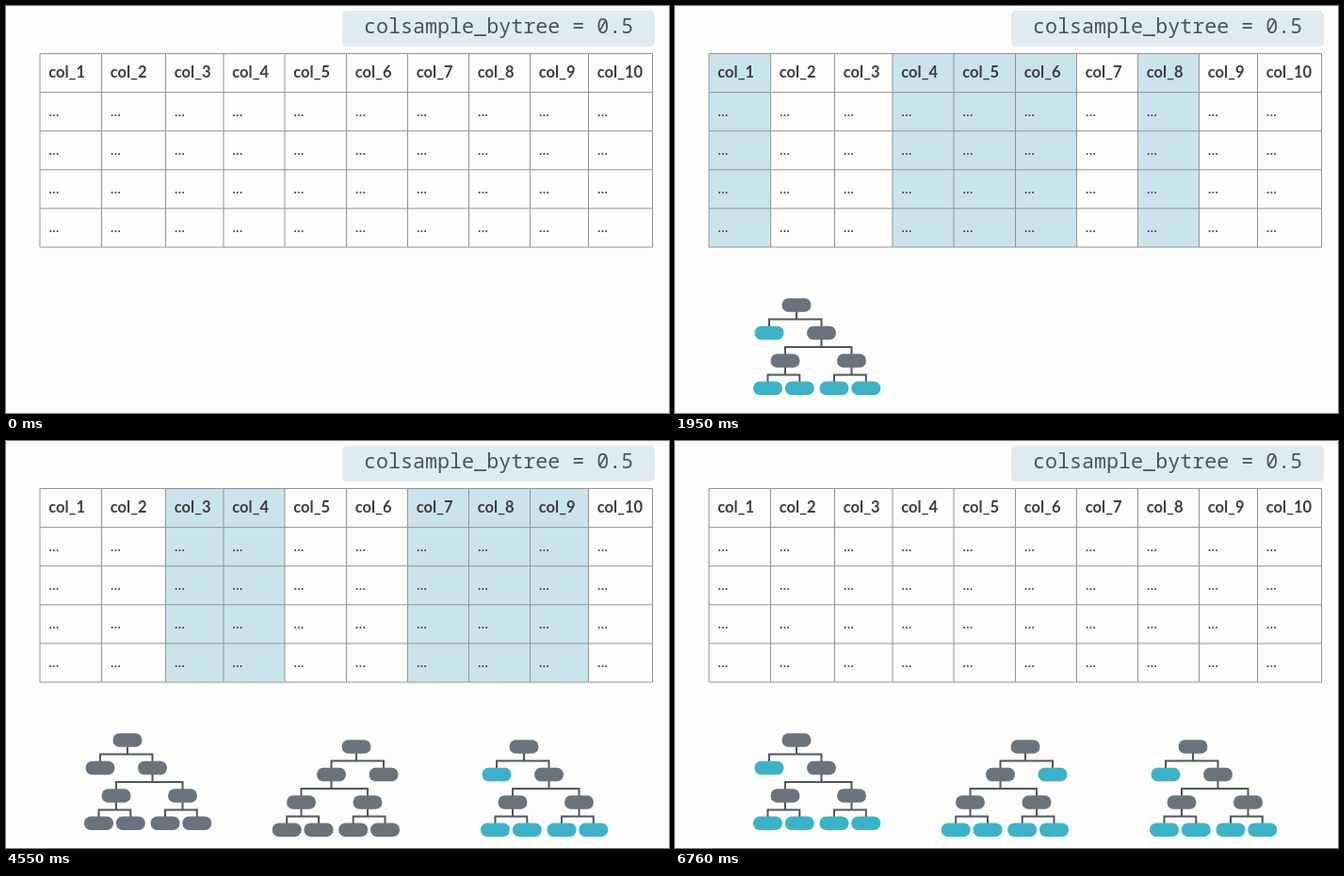
Recreate the animation shown at these times as an HTML page. Size 704x432 px, loop 7150 ms.

```html
<!DOCTYPE html>
<html lang="en">
<head>
<meta charset="utf-8">
<title>Column sampling by tree</title>
<style>
  html, body { margin: 0; width: 100%; height: 100%; overflow: hidden; background: #fdfdfc; }
  svg { display: block; width: 704px; height: 432px; }
  text { fill: #3c3d3f; }
  .code { font: 21.7px "Noto Sans Mono", monospace; fill: #4b5358; white-space: pre; }
  .head { font: bold 16.5px Lato, sans-serif; }
  .cell { font: 16px Lato, sans-serif; }
  .grid { fill: none; stroke: #919394; stroke-width: 1; }
  .sample { fill: #cae4ec; }
  .link { fill: none; stroke: #50565b; stroke-width: 2; }
  .node { fill: #68737d; }
  .leaf { fill: #3cb2c8; }

  .sample, .tree, .leaf { animation: 7150ms step-end infinite; }
  .sample.s0 { animation-name: sample0; }
  .sample.s1 { animation-name: sample1; }
  .sample.s2 { animation-name: sample2; }
  .tree.s0 { animation-name: grow0; }
  .tree.s1 { animation-name: grow1; }
  .tree.s2 { animation-name: grow2; }
  .s0 .leaf { animation-name: rest0; }
  .s1 .leaf { animation-name: rest1; }

  @keyframes sample0 { 0%, 45.4545%, 100% { opacity: 0 } 27.2727% { opacity: 1 } }
  @keyframes sample1 { 0%, 63.6363%, 100% { opacity: 0 } 45.4545% { opacity: 1 } }
  @keyframes sample2 { 0%, 80%, 100% { opacity: 0 } 63.6363% { opacity: 1 } }
  @keyframes grow0 { 0% { opacity: 0 } 27.2727%, 100% { opacity: 1 } }
  @keyframes grow1 { 0% { opacity: 0 } 45.4545%, 100% { opacity: 1 } }
  @keyframes grow2 { 0% { opacity: 0 } 63.6363%, 100% { opacity: 1 } }
  @keyframes rest0 { 0%, 80%, 100% { fill: #3cb2c8 } 45.4545% { fill: #68737d } }
  @keyframes rest1 { 0%, 80%, 100% { fill: #3cb2c8 } 63.6363% { fill: #68737d } }
</style>
</head>
<body>
<svg id="stage" viewBox="0 0 704 432"></svg>
<script>
  const edges = [36, 101.5, 169.5, 231, 296, 361.5, 426.5, 491.5, 556.5, 618.5, 686.5];
  const tableTop = 50.5, rowHeight = 41.1, rowCount = 5;
  const tableHeight = rowCount * rowHeight;
  const samples = [[1, 4, 5, 6, 8], [2, 3, 5, 6, 9], [3, 4, 7, 8, 9]];
  const trees = [
    { x: 129, y: 317.5, side: 1 },
    { x: 372, y: 324.5, side: -1 },
    { x: 550, y: 324.5, side: 1 }
  ];

  const label = (x, y, kind, words) => `<text x="${x}" y="${y}" class="${kind}">${words}</text>`;

  function drawTable() {
    const washes = samples.map((columns, i) => `<g class="sample s${i}">` + columns.map(c =>
      `<rect x="${edges[c - 1]}" y="${tableTop}" width="${edges[c] - edges[c - 1]}" height="${tableHeight}"/>`
    ).join('') + '</g>').join('');

    let lines = '', labels = '';
    for (const x of edges) lines += `M${x} ${tableTop}v${tableHeight}`;
    for (let r = 0; r <= rowCount; r++) {
      lines += `M${edges[0]} ${tableTop + r * rowHeight}H${edges.at(-1)}`;
    }
    edges.slice(0, -1).forEach((x, i) => {
      labels += label(x + 9.3, 75.7, 'head', `col_${i + 1}`);
      for (let r = 1; r < rowCount; r++) labels += label(x + 9.2, 75.6 + r * rowHeight, 'cell', '...');
    });
    return `${washes}<path class="grid" d="${lines}"/>${labels}`;
  }

  function drawTree({ x, y, side }, i) {
    const at = dx => x + side * dx;
    const pill = (dx, dy, kind) =>
      `<rect class="${kind}" x="${at(dx) - 15.4}" y="${y + dy - 7.3}" width="30.8" height="14.6" rx="6.8"/>`;
    const fork = (dx, dy, a, b) =>
      `M${at(dx)} ${y + dy}v15M${at(a)} ${y + dy + 29}v-14H${at(b)}v14`;
    const links = fork(0, 0, -29, 26.5) + fork(26.5, 29.5, -12, 58.5) +
      fork(-12, 59, -30.5, 3.3) + fork(58.5, 59, 40, 73.8);
    const inner = [[0, 0], [26.5, 29.5], [-12, 59], [58.5, 59]];
    const leaves = [[-29, 29.5], [-30.5, 88.3], [3.3, 88.3], [40, 88.3], [73.8, 88.3]];
    return `<g class="tree s${i}"><path class="link" d="${links}"/>` +
      inner.map(p => pill(...p, 'node')).join('') +
      leaves.map(p => pill(...p, 'leaf')).join('') + '</g>';
  }

  document.getElementById('stage').innerHTML =
    '<rect x="357" y="5" width="332" height="38" rx="5" fill="#deebf0"/>' +
    label(380, 29, 'code', 'colsample_bytree = 0.5') +
    drawTable() + trees.map(drawTree).join('');
</script>
</body>
</html>
```
